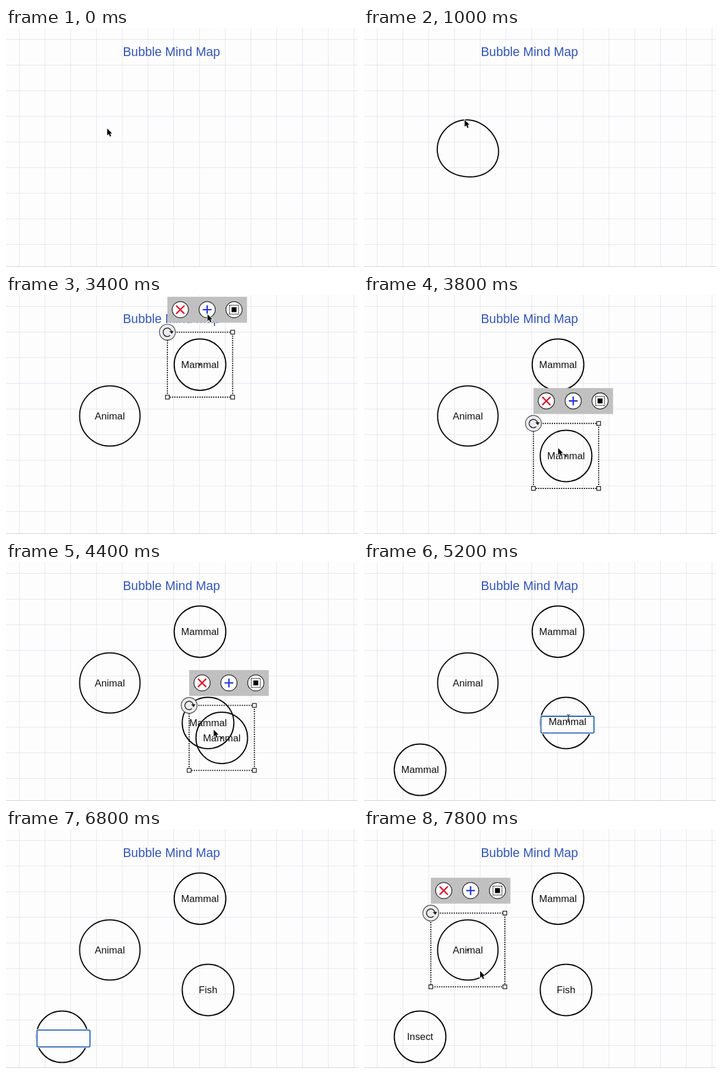
These frames come from a looping animation (600 by 409 pixels, 8000 ms). An HTML page:

```html
<!DOCTYPE html>
<html lang="en">
<head>
<meta charset="utf-8">
<title>Bubble Mind Map</title>
<style>
  html, body { margin: 0; width: 100%; height: 100%; overflow: hidden; background: #fefdfe; }
  svg { display: block; width: 100%; height: 100%; }
  text { font-family: "Liberation Sans", Arial, sans-serif; text-anchor: middle; }
</style>
</head>
<body>
<svg viewBox="0 0 600 409">
  <g id="grid" stroke="#e5e5ea" stroke-width="1"></g>
  <path d="M0 408.4H600" stroke="#cfcfd2"/>
  <text x="282" y="47.5" font-size="21.3" fill="#3356b4">Bubble Mind Map</text>
  <g id="scene"></g>
</svg>
<script>
const STEP = 200, STEPS = 40;
const scene = document.getElementById('scene');

// Each list is keyed by step; the latest key that has passed applies.
const bubbles = [
  { r: 51.5, draw: { 1: .05, 2: .28, 3: .52, 4: .78, 5: 1 },
    pos: [[6, 177, 207]],
    text: [[8, 'Animal']], edit: [[7, 8]], select: [[39, 39]] },
  { r: 44, draw: { 9: .35, 10: .82 },
    pos: [[11, 330.7, 119.2]],
    text: [[13, 'Mam'], [14, 'Mammal']], edit: [[12, 14]], select: [[16, 17]] },
  { r: 44, pos: [[18, 347, 236], [19, 344.4, 275.4]],
    text: [[18, 'Mammal'], [27, ''], [28, 'F'], [29, 'Fish']],
    edit: [[26, 30]], select: [[18, 21]] },
  { r: 44, pos: [[22, 367.8, 301], [23, 222, 334], [24, 95.6, 355.6]],
    text: [[22, 'Mammal'], [34, ''], [35, 'Ins'], [36, 'Insect']],
    edit: [[33, 36]], select: [[22, 24]] }
];

// [first step, last step, x from, y from, x to, y to, shape]
const pointer = [
  [0, 0, 172.5, 172], [6, 6, 174, 164], [11, 11, 325.5, 84.5],
  [15, 16, 340, 92, 331, 106], [17, 17, 343.5, 33], [18, 18, 333, 223],
  [19, 21, 331, 262, 345, 190], [22, 22, 354, 287], [23, 23, 208, 321],
  [24, 24, 82, 342], [25, 25, 262, 303], [26, 26, 348.5, 267, 0, 0, 'beam'],
  [31, 32, 322, 280, 170, 327], [33, 33, 99, 348, 0, 0, 'beam'],
  [37, 39, 110, 345, 198, 243]
];

const latest = (keys, k) => keys.filter(key => key[0] <= k).pop();
const within = (spans, k) => spans.some(([a, b]) => k >= a && k <= b);

const label = (x, y, s) =>
  `<text x="${x}" y="${y + 5.8}" font-size="16.8" fill="#111">${s}</text>`;

function arrow(x, y) {
  return `<path transform="translate(${x} ${y})" fill="#000" stroke="#fff" stroke-width="1.6"
    paint-order="stroke" d="M0 0V11.8L2.7 9.3L4.6 13.7L6.7 12.8L4.8 8.5H8.3Z"/>`;
}

function beam(x, y) {
  return `<path transform="translate(${x} ${y})" fill="none" stroke="#333" stroke-width="1.1"
    d="M-3 -6Q0 -6 0 -4Q0 -6 3 -6M0 -4V6M-3 7Q0 7 0 5Q0 7 3 7M-2 2H2"/>`;
}

function sketch(b, p) {
  const [, cx, cy] = b.pos[0];
  const pts = [];
  let x, y;
  for (let i = 0; i <= 60 * p; i++) {
    const a = -1.68 - i / 60 * Math.PI * 2;
    const r = b.r * (.98 + .04 * Math.sin(2 * a + 1) + .02 * Math.sin(3 * a));
    x = cx + r * Math.cos(a);
    y = cy + r * Math.sin(a);
    pts.push(x.toFixed(1) + ',' + y.toFixed(1));
  }
  return `<polyline points="${pts.join(' ')}" fill="none" stroke="#0a0a0a" stroke-width="2"
    stroke-linecap="round"/>` + arrow(x, y);
}

function editor(x, y, r, s) {
  const box = `x="${x - r + 1.2}" y="${y - 11.4}" width="${2 * r + 2.4}" height="28.6" rx="2"`;
  return `<rect ${box} fill="#fefdfe" stroke="#fefdfe" stroke-width="4"/>
    <rect ${box} fill="none" stroke="#1f5fae" stroke-width="1.8"/>` + label(x + 2.4, y - 2, s);
}

function selection(x, y, r) {
  const h = r + 11.6, l = x - h, t = y - h, by = t - 38.5;
  const handle = (hx, hy) =>
    `<rect x="${hx - 3.3}" y="${hy - 3.3}" width="6.6" height="6.6" fill="#fff" stroke="#222" stroke-width="1.3"/>`;
  const button = (dx, icon) =>
    `<g transform="translate(${l + dx} ${by})"><circle r="13.8" fill="#fff" stroke="#222" stroke-width="1.3"/>${icon}</g>`;
  return `<rect x="${l}" y="${t}" width="${2 * h}" height="${2 * h}" fill="none" stroke="#111"
      stroke-width="1.9" stroke-dasharray="2 1.9"/>
    <circle cx="${x}" cy="${y}" r="1.6"/>
    ${handle(x + h, t)}${handle(l, y + h)}${handle(x + h, y + h)}
    <g transform="translate(${l} ${t})">
      <circle r="13.6" fill="#ececee" stroke="#444" stroke-width="1.2"/>
      <path d="M4.8 5.4A7.2 7.2 0 1 1 7 -.8" fill="none" stroke="#222" stroke-width="1.5"/>
      <path d="M3.4 -1.6L10.8 -2.2L7.6 3Z" fill="#222"/>
    </g>
    <rect x="${l}" y="${t - 60.5}" width="135.7" height="44.3" fill="#c0c0c1"/>
    ${button(22, '<path d="M-7 -7L7 7M7 -7L-7 7" stroke="#e0142c" stroke-width="2.4"/>')}
    ${button(67.8, '<path d="M-7.5 0H7.5M0 -7.5V7.5" stroke="#2436d6" stroke-width="2.4"/>')}
    ${button(113.6, `<rect x="-7.7" y="-7.7" width="15.4" height="15.4" fill="none" stroke="#111"
      stroke-width="1.5" stroke-dasharray="1.5 1.2"/><rect x="-4.2" y="-4.2" width="8.4" height="8.4"/>`)}`;
}

function bubble(b, k) {
  if (b.draw && b.draw[k]) return sketch(b, b.draw[k]);
  const pos = latest(b.pos, k);
  if (!pos) return '';
  const [, x, y] = pos;
  const s = (latest(b.text, k) || [0, ''])[1];
  return `<circle cx="${x}" cy="${y}" r="${b.r}" fill="none" stroke="#0a0a0a" stroke-width="2"/>` +
    (within(b.edit, k) ? editor(x, y, b.r, s) : label(x, y, s)) +
    (within(b.select, k) ? selection(x, y, b.r) : '');
}

function cursor(k) {
  const c = pointer.find(([a, b]) => k >= a && k <= b);
  if (!c) return '';
  const [a, b, x, y, x2, y2, shape] = c;
  const p = b > a ? (k - a) / (b - a) : 0;
  const at = p ? [x + (x2 - x) * p, y + (y2 - y) * p] : [x, y];
  return shape ? beam(...at) : arrow(...at);
}

function drawGrid() {
  let d = '';
  for (let i = 0; i < 14; i++) d += `M${22.5 + i * 43.9} 0V409`;
  for (let i = 0; i < 9; i++) d += `M0 ${19.6 + i * 43.87}H600`;
  document.getElementById('grid').innerHTML = `<path d="${d}"/>`;
}

let shown = -1;
function render(ms) {
  const k = Math.floor(ms / STEP) % STEPS;
  if (k === shown) return;
  shown = k;
  scene.innerHTML = bubbles.map(b => bubble(b, k)).join('') + cursor(k);
}

drawGrid();
render(0);
const start = performance.now();
requestAnimationFrame(function tick() {
  render(performance.now() - start);
  requestAnimationFrame(tick);
});
</script>
</body>
</html>
```
